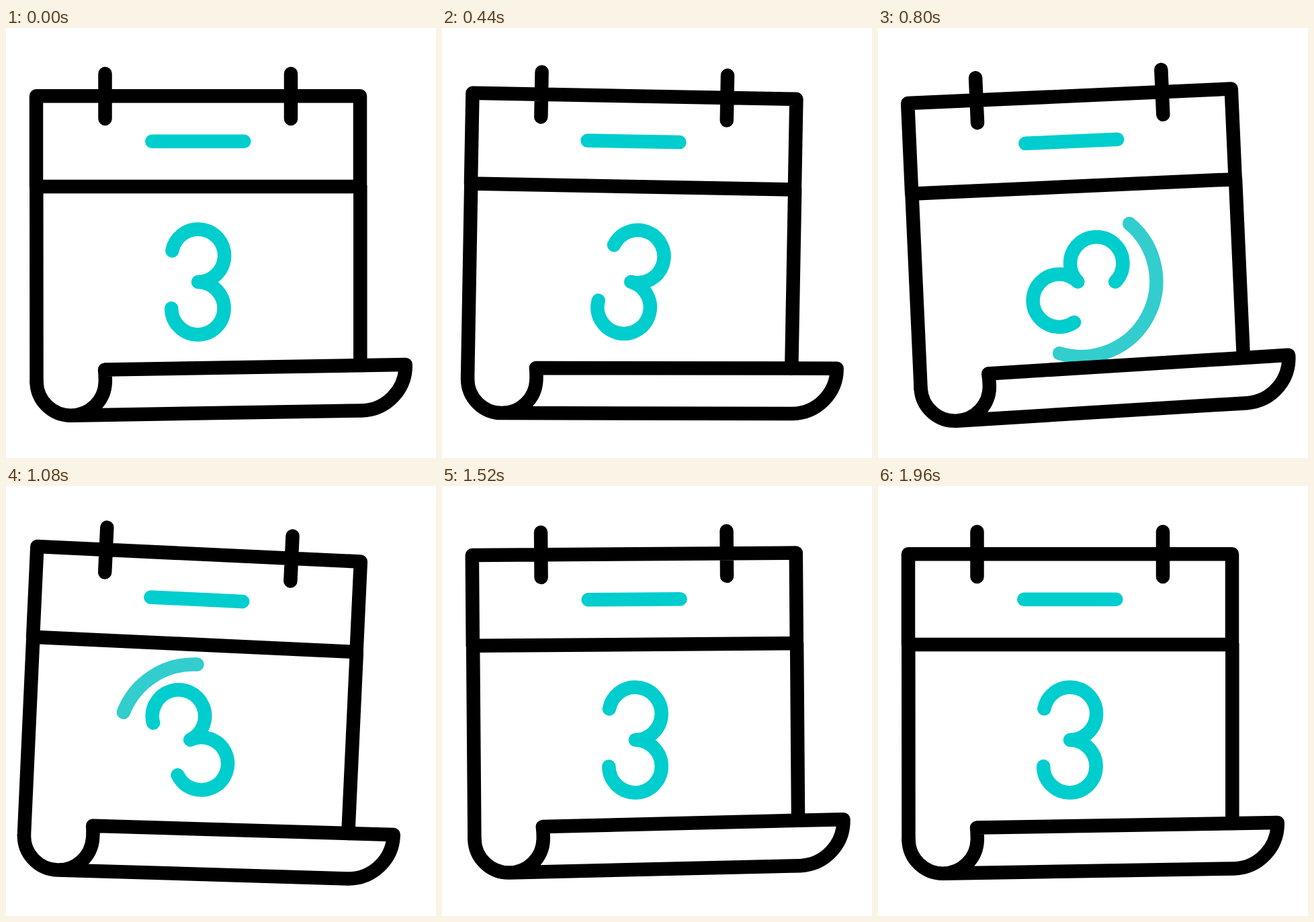
Recreate the animation shown at these times as an HTML page. Size 640 by 640 pixels, loop 2.4 s.

```html
<!DOCTYPE html>
<html lang="en">
<head>
<meta charset="utf-8">
<title>Calendar</title>
<style>
  html, body { margin: 0; width: 100%; height: 100%; overflow: hidden; background: #fff; }
  svg { display: block; width: 100vw; height: 100vh; }
  path { fill: none; stroke: #000; stroke-width: 20.5; stroke-linecap: round; stroke-linejoin: round; }
  .teal { stroke: #00cdcd; }
  .trail { stroke: #33cdcd; }
</style>
</head>
<body>
<svg viewBox="0 0 640 640">
  <g id="calendar">
    <path id="trail" class="trail"/>
    <path id="digit" class="teal" d="M247.4 331.4A39.2 39.2 0 1 1 286 378A39.2 39.2 0 1 1 246.2 417.2"/>
    <path class="teal" d="M217.3 168.8H354.3"/>
    <path d="M45 236V101.3H527V236ZM147.5 68V135M424 68V135"/>
    <path id="sides"/>
    <path id="roll" d="M45.5 527A51 51 0 0 0 97 576.7A51 51 0 0 0 147.8 527Q148 517 147 508.6L594.7 501A67 67 0 0 1 530 569.5L97 576.7"/>
  </g>
</svg>
<script>
const LOOP = 2400, STEP = 40;
const PIVOT = '286 125';
const RING = { x: 291, y: 377.5, r: 112 };

// Keys are [time, value] pairs.
const swing = [0, -5, 5, -3, 3, -2, 2, 0].map((angle, i) => [i * 280, angle]);
const drop = [[1000, 0], [1320, 26], [1480, -3], [1640, 0]];
const trailHead = [[500, 0], [1060, 1]];
const trailTail = [[680, 0], [1240, 1]];

const $ = id => document.getElementById(id);
const clamp = v => Math.min(1, Math.max(0, v));
const smooth = p => p * p * (3 - 2 * p);

function valueAt(keys, t) {
  if (t <= keys[0][0]) return keys[0][1];
  for (let i = 1; i < keys.length; i++) {
    const [t0, a] = keys[i - 1], [t1, b] = keys[i];
    if (t < t1) return a + (b - a) * smooth((t - t0) / (t1 - t0));
  }
  return keys[keys.length - 1][1];
}

// Cubic bezier easing with flat ends, solved by bisection.
function ease(p, x1, x2) {
  let lo = 0, hi = 1;
  for (let i = 0; i < 24; i++) {
    const u = (lo + hi) / 2, v = 1 - u;
    if (3 * u * v * v * x1 + 3 * u * u * v * x2 + u ** 3 < p) lo = u;
    else hi = u;
  }
  return smooth(lo);
}

function ringPoint(turn) {
  const a = (turn - 0.25) * 2 * Math.PI;
  return `${RING.x + RING.r * Math.cos(a)} ${RING.y + RING.r * Math.sin(a)}`;
}

function ringArc(from, to) {
  if (to - from < 0.001) return '';
  const large = to - from > 0.5 ? 1 : 0;
  return `M${ringPoint(from)}A${RING.r} ${RING.r} 0 ${large} 1 ${ringPoint(to)}`;
}

function draw(t) {
  const dy = valueAt(drop, t), dx = dy * 0.0166;
  const spin = 360 * ease(clamp((t - 320) / 1080), 0.355, 0.315);
  $('calendar').setAttribute('transform', `rotate(${valueAt(swing, t)} ${PIVOT})`);
  $('digit').setAttribute('transform', `rotate(${spin} 286 378)`);
  $('trail').setAttribute('d', ringArc(valueAt(trailTail, t), valueAt(trailHead, t)));
  $('sides').setAttribute('d', `M45.3 236L${45.5 + dx} ${527 + dy}M527.3 236V${502 + dy}`);
  $('roll').setAttribute('transform', `translate(${dx} ${dy})`);
}

const start = performance.now();
function tick() {
  const t = (performance.now() - start) % LOOP;
  draw(Math.floor(t / STEP) * STEP);
  requestAnimationFrame(tick);
}
tick();
</script>
</body>
</html>
```
